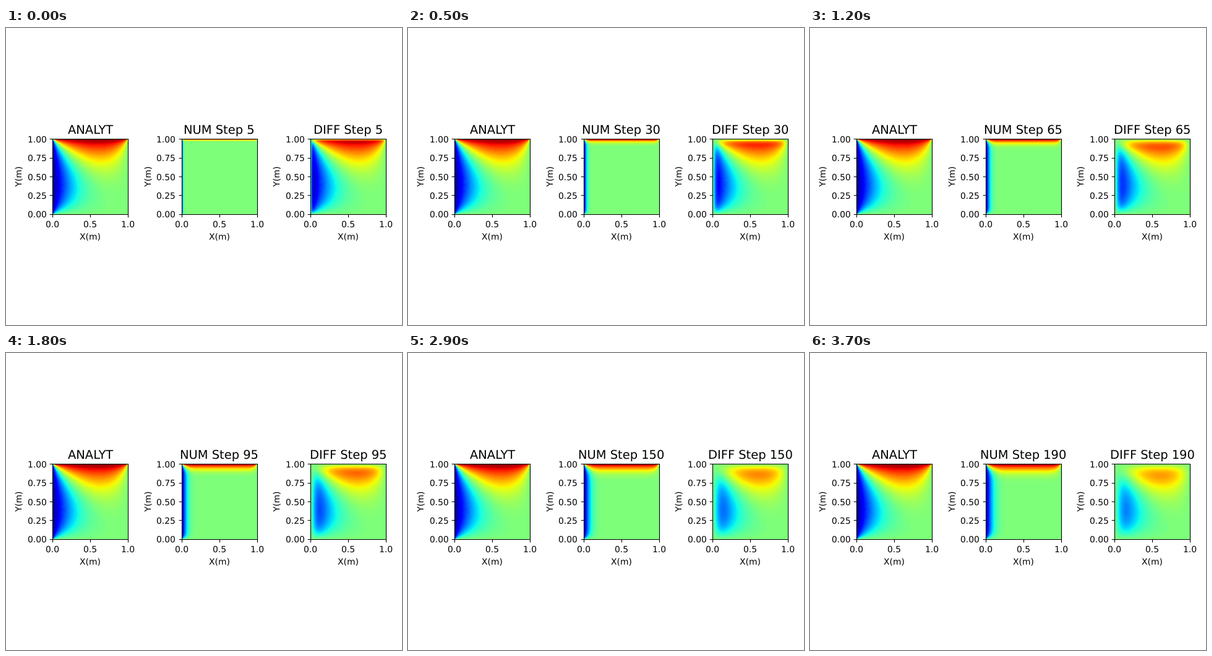
An HTML page with a canvas for the animation above (3800 ms loop, 640 by 480 pixels).

```html
<!DOCTYPE html>
<html lang="en">
<head>
<meta charset="utf-8">
<title>Laplace relaxation</title>
<style>
  html, body { margin: 0; width: 640px; height: 480px; overflow: hidden; background: #fff; }
  canvas, svg { position: absolute; left: 0; top: 0; display: block; }
  text { font: 13.889px "DejaVu Sans", sans-serif; text-rendering: geometricPrecision; }
  .title { font-size: 19.444px; }
  .upright { text-anchor: middle; }
  path { fill: none; stroke: #000; stroke-width: 1.11; stroke-linecap: square; }
  .ticks { stroke-linecap: butt; }
</style>
</head>
<body>
<canvas id="fields" width="640" height="480"></canvas>
<svg id="axes" width="640" height="480" viewBox="0 0 640 480"></svg>
<script>
const LEFT = [75.45, 283.95, 492.45], TOP = 179.2, SIZE = 121.6;
const N = 101, BANDS = 99, FRAMES = 38, STEPS = 5, FRAME_MS = 100;
const ctx = document.getElementById('fields').getContext('2d');
const svg = document.getElementById('axes');

function add(tag, attrs, text = '') {
  const el = document.createElementNS('http://www.w3.org/2000/svg', tag);
  for (const key in attrs) el.setAttribute(key, attrs[key]);
  el.textContent = text;
  svg.append(el);
  return el;
}

const snap = v => Math.round(v) + 0.5;

// Start text on a whole pixel; align 0.5 centres it on x, 1 ends it there
function setText(el, text, x, align) {
  el.textContent = text;
  el.setAttribute('x', Math.round(x - el.getComputedTextLength() * align));
}

function label(text, x, y, align = 0.5) {
  setText(add('text', { y: Math.round(y) }), text, x, align);
}

function drawAxes(left) {
  const x0 = snap(left), x1 = snap(left + SIZE);
  const y0 = snap(TOP), y1 = snap(TOP + SIZE);
  let ticks = '';
  for (const v of [0, 0.5, 1]) {
    const x = left + v * SIZE;
    ticks += `M${snap(x)} ${y1}v4.86`;
    label(v.toFixed(1), x, 322);
  }
  for (const v of [0, 0.25, 0.5, 0.75, 1]) {
    const y = TOP + (1 - v) * SIZE;
    ticks += `M${x0} ${snap(y)}h-4.86`;
    label(v.toFixed(2), left - 9.72, y + 5.5, 1);
  }
  add('path', { d: ticks, class: 'ticks' });
  add('path', { d: `M${x0} ${y0}H${x1}V${y1}H${x0}Z` });
  label('X(m)', left + SIZE / 2, 342);
  add('text', { transform: `translate(${Math.round(left - 50)} 240) rotate(-90)`, class: 'upright' }, 'Y(m)');
  return add('text', { y: 171, class: 'title' });
}

// Jet colour map
const ramp = (v, a, b) => Math.min(1, Math.max(0, (v - a) / (b - a)));
function jet(v) {
  return [
    ramp(v, 0.35, 0.66) - 0.5 * ramp(v, 0.89, 1),
    ramp(v, 0.125, 0.375) - ramp(v, 0.64, 0.91),
    0.5 + 0.5 * ramp(v, 0, 0.11) - ramp(v, 0.34, 0.65)
  ].map(c => Math.round(Math.min(1, Math.max(0, c)) * 255));
}
const palette = Array.from({ length: BANDS }, (_, i) =>
  jet(Math.floor((i + 0.5) / BANDS * 256) / 255));

// Left edge -1, top edge +1, the other edges 0
function withEdges(grid) {
  for (let i = 1; i < N - 1; i++) {
    grid[i * N] = -1;
    grid[i * N + N - 1] = 0;
    grid[i] = 0;
    grid[(N - 1) * N + i] = 1;
  }
  return grid;
}

// Share of a unit hot top edge, as a Fourier series
function topShare(x, y) {
  let sum = 0;
  for (let n = 1; n < 200; n += 2) {
    const k = n * Math.PI, decay = Math.exp(k * (y - 1));
    if (decay < 1e-7) break;
    sum += 4 / k * Math.sin(k * x) * decay * (1 - Math.exp(-2 * k * y)) / (1 - Math.exp(-2 * k));
  }
  return sum;
}

function solveExact() {
  const grid = new Float64Array(N * N), h = 1 / (N - 1);
  for (let j = 1; j < N - 1; j++)
    for (let i = 1; i < N - 1; i++)
      grid[j * N + i] = topShare(i * h, j * h) - topShare(j * h, 1 - i * h);
  return withEdges(grid);
}

function relax(grid) {
  const next = grid.slice();
  for (let j = 1; j < N - 1; j++)
    for (let i = 1; i < N - 1; i++) {
      const p = j * N + i;
      next[p] = (grid[p - 1] + grid[p + 1] + grid[p - N] + grid[p + N]) / 4;
    }
  return next;
}

function sample(grid, x, y) {
  const i = Math.min(N - 2, Math.floor(x)), j = Math.min(N - 2, Math.floor(y));
  const u = x - i, v = y - j, p = j * N + i;
  return (grid[p] * (1 - u) + grid[p + 1] * u) * (1 - v)
       + (grid[p + N] * (1 - u) + grid[p + N + 1] * u) * v;
}

function drawField(grid, left) {
  const px = Math.round(left), py = Math.round(TOP);
  const w = Math.round(left + SIZE) - px + 1, h = Math.round(TOP + SIZE) - py + 1;
  const img = ctx.createImageData(w, h);
  const toGrid = d => Math.min(1, Math.max(0, d / SIZE)) * (N - 1);
  for (let r = 0, o = 0; r < h; r++) {
    const y = toGrid(TOP + SIZE - (py + r + 0.5));
    for (let c = 0; c < w; c++, o += 4) {
      const v = sample(grid, toGrid(px + c + 0.5 - left), y);
      const band = Math.floor((v + 1) / 2 * BANDS);
      const rgb = palette[Math.min(BANDS - 1, Math.max(0, band))];
      img.data[o] = rgb[0];
      img.data[o + 1] = rgb[1];
      img.data[o + 2] = rgb[2];
      img.data[o + 3] = 255;
    }
  }
  ctx.putImageData(img, px, py);
}

const exact = solveExact();
const stages = [];
let state = withEdges(new Float64Array(N * N));
for (let s = 1; s <= FRAMES * STEPS; s++) {
  state = relax(state);
  if (s % STEPS === 0) stages.push(state);
}

const titles = LEFT.map(drawAxes);

function drawPanel(i, title, grid) {
  setText(titles[i], title, LEFT[i] + SIZE / 2, 0.5);
  drawField(grid, LEFT[i]);
}

drawPanel(0, 'ANALYT', exact);

let shown = -1;
function show(time) {
  const k = Math.floor(time / FRAME_MS) % FRAMES;
  if (k === shown) return;
  shown = k;
  const step = (k + 1) * STEPS;
  drawPanel(1, `NUM Step ${step}`, stages[k]);
  drawPanel(2, `DIFF Step ${step}`, exact.map((v, i) => v - stages[k][i]));
}

function tick() {
  show(performance.now());
  requestAnimationFrame(tick);
}
tick();
</script>
</body>
</html>
```
